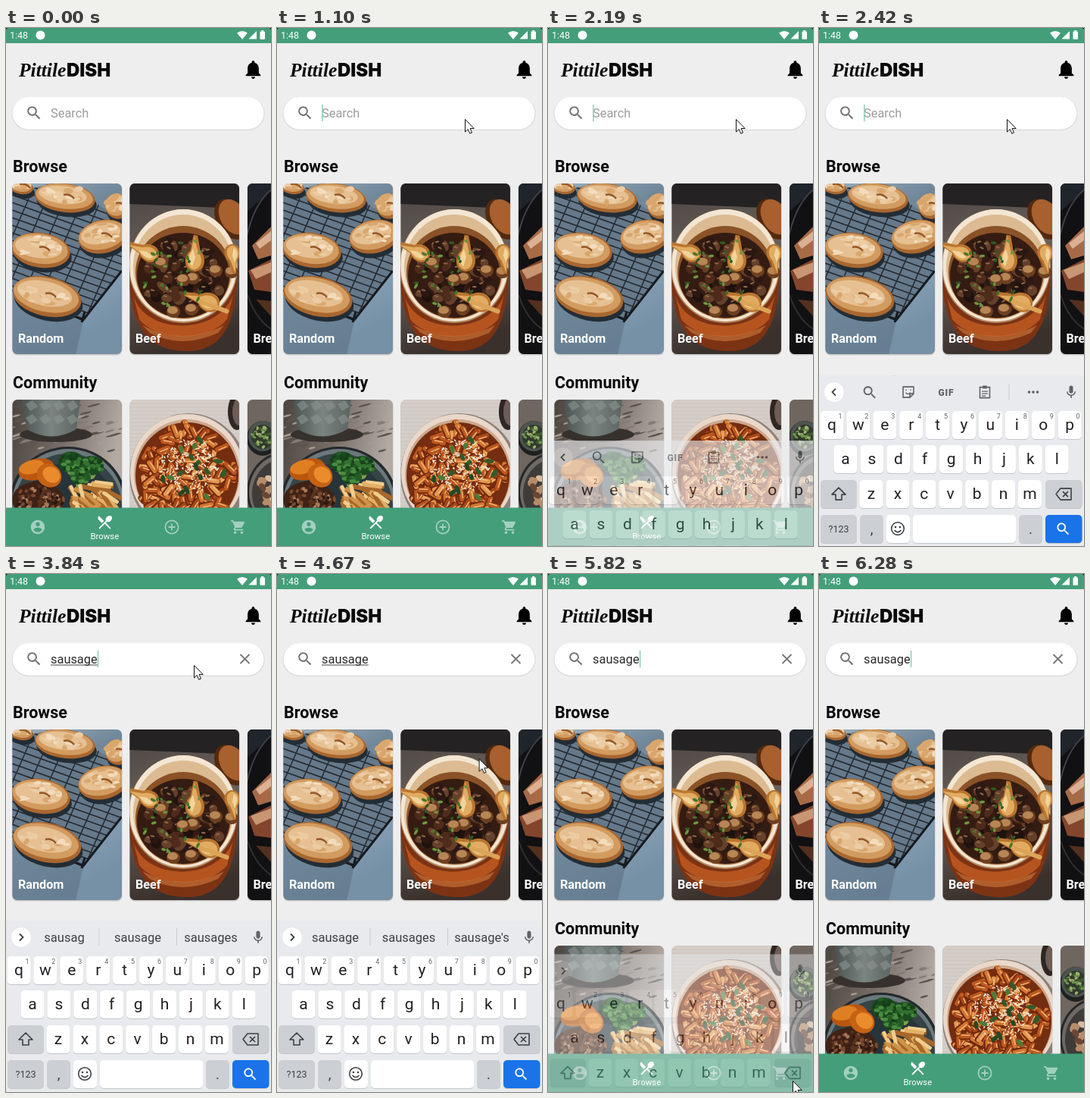
Animation, 350 px wide and 683 px high, one loop 8000 ms. Source, as an HTML page:

```html
<!DOCTYPE html>
<html lang="en">
<head>
<meta charset="utf-8">
<title>Recipe search</title>
<style>
html, body { margin: 0; width: 100%; height: 100%; overflow: hidden; background: #eee; }
svg { display: block; width: 350px; height: 683px; font-family: Roboto, sans-serif; }
.mid { text-anchor: middle; }
</style>
</head>
<body>
<svg id="stage" viewBox="0 0 350 683"></svg>
<script>
const GREEN = '#449e7a', GREY = '#5f6368', LOOP = 8000;

let seed = 48271;
const rnd = (a = 0, b = 1) => {
  seed = seed * 16807 % 2147483647;
  return a + (b - a) * seed / 2147483647;
};
const pick = list => list[Math.floor(rnd(0, list.length))];
const repeat = (n, fn) => Array.from({ length: n }, (_, i) => fn(i)).join('');

const ell = (x, y, rx, ry, fill, rot = 0) =>
  `<ellipse cx="${x}" cy="${y}" rx="${rx}" ry="${ry}" fill="${fill}" transform="rotate(${rot} ${x} ${y})"/>`;
const box = (x, y, w, h, fill, r = 0, more = '') =>
  `<rect x="${x}" y="${y}" width="${w}" height="${h}" rx="${r}" fill="${fill}" ${more}/>`;
const shape = (d, fill, more = '') => `<path d="${d}" fill="${fill}" ${more}/>`;
const line = (d, color, w = 1, more = '') =>
  `<path d="${d}" fill="none" stroke="${color}" stroke-width="${w}" ${more}/>`;
const text = (x, y, size, str, fill, more = '') =>
  `<text x="${x}" y="${y}" font-size="${size}" fill="${fill}" ${more}>${str}</text>`;
// 24-unit icon centred on x, y
const icon = (name, x, y, k, fill) =>
  shape(icons[name], fill, `transform="translate(${x - 12 * k} ${y - 12 * k}) scale(${k})"`);
// n random spots inside an ellipse
const scatter = (n, cx, cy, rx, ry, fn) => repeat(n, () => {
  const a = rnd(0, 6.283), r = Math.sqrt(rnd());
  return fn(cx + rx * r * Math.cos(a), cy + ry * r * Math.sin(a));
});
const gradient = (id, x2, y2, ...colors) =>
  `<linearGradient id="${id}" x2="${x2}" y2="${y2}">` +
  colors.map((c, i) => `<stop offset="${i / (colors.length - 1)}" stop-color="${c}"/>`).join('') + '</linearGradient>';

const icons = {
  bell: 'M12 22c1.1 0 2-.9 2-2h-4c0 1.1.89 2 2 2zm6-6v-5c0-3.07-1.64-5.64-4.5-6.32V4c0-.83-.67-1.5-1.5-1.5s-1.5.67-1.5 1.5v.68C7.63 5.36 6 7.92 6 11v5l-2 2v1h16v-1l-2-2z',
  user: 'M12 2C6.48 2 2 6.48 2 12s4.48 10 10 10 10-4.48 10-10S17.52 2 12 2zm0 3c1.66 0 3 1.34 3 3s-1.34 3-3 3-3-1.34-3-3 1.34-3 3-3zm0 14.2c-2.5 0-4.71-1.28-6-3.22.03-1.99 4-3.08 6-3.08 1.99 0 5.97 1.09 6 3.08-1.29 1.94-3.5 3.22-6 3.22z',
  food: 'M8.1 13.34l2.83-2.83L3.91 3.5c-1.56 1.56-1.56 4.09 0 5.66l4.19 4.18zm6.78-1.81c1.53.71 3.68.21 5.27-1.38 1.91-1.91 2.28-4.65.81-6.12-1.46-1.46-4.2-1.1-6.12.81-1.59 1.59-2.09 3.74-1.38 5.27L3.7 19.87l1.41 1.41L12 14.41l6.88 6.88 1.41-1.41L13.41 13l1.47-1.47z',
  cart: 'M7 18c-1.1 0-1.99.9-1.99 2S5.9 22 7 22s2-.9 2-2-.9-2-2-2zM1 2v2h2l3.6 7.59-1.35 2.45c-.16.28-.25.61-.25.96 0 1.1.9 2 2 2h12v-2H7.42c-.14 0-.25-.11-.25-.25l.03-.12.9-1.63h7.45c.75 0 1.41-.41 1.75-1.03l3.58-6.49c.08-.14.12-.31.12-.48 0-.55-.45-1-1-1H5.21l-.94-2H1zm16 16c-1.1 0-1.99.9-1.99 2s.89 2 1.99 2 2-.9 2-2-.9-2-2-2z',
  search: 'M15.5 14h-.79l-.28-.27C15.41 12.59 16 11.11 16 9.5 16 5.91 13.09 3 9.5 3S3 5.91 3 9.5 5.91 16 9.5 16c1.61 0 3.09-.59 4.23-1.57l.27.28v.79l5 4.99L20.49 19l-4.99-5zm-6 0C7.01 14 5 11.99 5 9.5S7.01 5 9.5 5 14 7.01 14 9.5 11.99 14 9.5 14z',
  mic: 'M12 14c1.66 0 2.99-1.34 2.99-3L15 5c0-1.66-1.34-3-3-3S9 3.34 9 5v6c0 1.66 1.34 3 3 3zm5.3-3c0 3-2.54 5.1-5.3 5.1S6.7 14 6.7 11H5c0 3.41 2.72 6.23 6 6.72V21h2v-3.28c3.28-.48 6-3.3 6-6.72h-1.7z'
};

function pastry(x, y, rx, ry, rot) {
  return ell(x + 2, y + 6, rx, ry, '#232d36', rot) +
    ell(x, y, rx, ry, '#a9672f', rot) +
    ell(x - 1, y - 2, rx * .95, ry * .86, '#d29b60', rot) +
    ell(x - 3, y - 4, rx * .8, ry * .62, '#e6c092', rot) +
    scatter(16, x - 2, y - 4, rx * .7, ry * .6, (a, b) =>
      ell(a, b, rnd(3, 8), rnd(1.5, 4), pick(['#f2dcbd', '#ebcca3', '#d9a76e']), rot + rnd(-20, 20))) +
    line(`M${x - 2} ${y - 4}q8 -2 14 5`, '#96582a', 2.5);
}

function rackPhoto() {
  const rack = 'M8 218L60 205 110 226 153 252V318L102 386 8 345Z';
  return box(8, 205, 146, 226, 'url(#slate)') + shape('M8 345L102 386 92 431H8Z', '#5e7486', 'opacity=".6"') +
    `<clipPath id="rack"><path d="${rack}"/></clipPath><g clip-path="url(#rack)">` +
    shape(rack, '#65798a') +
    repeat(22, i => line(`M8 ${150 + i * 10}l146 52`, '#262d35', 1.8)) +
    repeat(9, i => line(`M${30 + i * 24} 225l-72 165`, '#262d35', 1.6)) + '</g>' +
    line('M153 320L102 385 8 346', '#171b20', 3) + line('M104 374l-4 14', '#171b20', 3) +
    pastry(20, 210, 16, 9, 8) + pastry(78, 224, 40, 19, 7) + pastry(147, 235, 16, 17, -30) +
    pastry(128, 275, 33, 22, -12) + pastry(46, 293, 39, 23, 8) + pastry(54, 354, 46, 26, 12);
}

// bulb with a pointed end
function onion(x, y, rot, k = 1) {
  return `<g transform="translate(${x} ${y}) rotate(${rot}) scale(${k})">` +
    shape('M-19 0C-18-14-2-15 6-6L25-3 24 2 6 6C-2 14-18 13-19 0Z', '#b9752f') +
    shape('M-17-1C-15-11-2-12 5-5L23-2 5 3C-3 10-15 9-17-1Z', '#e0ac62') +
    shape('M-13-3C-9-9-2-8 8-3L-2 0Z', '#f2d49b') + '</g>';
}

function stewPhoto() {
  return box(163, 205, 146, 226, 'url(#cloth)') + shape('M163 205H309V238L163 232Z', '#242222') +
    ell(297, 252, 19, 29, '#54290f', -30) + ell(300, 249, 17, 25, '#a7602e', -30) +
    shape('M162 318C163 392 185 424 235 426S305 392 306 318Z', '#7c3314') +
    shape('M168 352C182 404 278 408 300 352L292 384C268 414 200 414 176 384Z', '#b6541f') +
    shape('M180 392Q232 420 288 392L280 402Q232 424 190 402Z', '#d07a3c', 'opacity=".6"') +
    ell(234, 314, 72, 75, '#b48a62') + ell(234, 313, 71, 74, '#f3e6d3') +
    ell(234, 315, 66, 69, '#dcbb92') + ell(234, 322, 63, 61, '#8b5227') + ell(234, 326, 61, 56, '#351c12') +
    scatter(75, 234, 328, 52, 47, (x, y) =>
      ell(x, y, rnd(5, 10), rnd(4, 8), pick(['#2c1812', '#4e2b1b', '#65402a', '#1f120e']), rnd(0, 180)) +
      ell(x - 2, y - 3, 3, 1.2, '#8d6445', rnd(-30, 30))) +
    [[247, 330], [277, 320], [234, 332], [252, 313], [221, 374], [245, 371], [298, 322], [205, 310]].map(([x, y]) =>
      ell(x, y, 9, 8, '#6d3f20') + ell(x - 1, y - 2, 7, 5, '#b78655')).join('') +
    onion(184, 294, 205) + onion(250, 300, -88, 1.1) + onion(262, 359, 200, 1.1) + onion(299, 302, 85, .9) +
    box(255, 357, 43, 6, '#dca458', 3, 'transform="rotate(20 255 357)"') +
    scatter(30, 228, 322, 50, 46, (x, y) => ell(x, y, rnd(2, 4), 1.8, pick(['#47742b', '#2f5a22', '#6e9641']), rnd(0, 180)));
}

function panPhoto() {
  return box(319, 205, 40, 226, '#111012') + shape('M319 205H350V214L319 242Z', '#20242b') +
    line('M318 275Q328 230 352 212', '#3f4046', 2) +
    shape('M325 287L350 262V300L333 305Z', '#a66a47') + shape('M330 284L350 268V280L335 291Z', '#dcb193') +
    shape('M320 320L350 305V348L328 345Z', '#84452d') + shape('M323 319L350 309V322L330 331Z', '#c99674') +
    shape('M330 358L350 360V380Z', '#53301f') + line('M319 352Q330 385 352 398', '#302f31', 2);
}

function dinnerPhoto() {
  const head = (x, y, r) => ell(x, y + 9, 6, 9, '#7f9f4a') + ell(x, y, r, r * .8, '#1c4a1f') +
    scatter(34, x, y, r, r * .75, (a, b) => ell(a, b, rnd(2, 4), 2.5, pick(['#245a25', '#33722f', '#163f1a', '#4a8c40'])));
  return box(8, 490, 146, 145, 'url(#stone)') +
    scatter(70, 80, 535, 80, 45, (x, y) => ell(x, y, rnd(4, 12), 1.3, pick(['#a59b93', '#5b534d', '#857b73']), -15)) +
    ell(66, 536, 48, 10, '#37312e') +
    shape('M21 490H98L93 529Q60 548 27 529Z', 'url(#pot)') +
    repeat(8, i => shape(`M${26 + i % 4 * 18} ${496 + (i >> 2) * 18}l9-5 7 8-10 6z`, '#8a9490', 'opacity=".6"')) +
    ell(82, 628, 78, 76, '#23292c') + ell(82, 628, 74, 73, '#6b787c') + ell(82, 632, 71, 71, '#364347') + ell(84, 637, 62, 64, '#27343a') +
    ell(42, 622, 34, 24, '#3f2216') +
    scatter(75, 44, 622, 33, 19, (x, y) => ell(x, y, rnd(2, 4), 2, pick(['#7b4a31', '#a87b5b', '#2c1710', '#59331f']), rnd(0, 180))) +
    ell(40, 582, 24, 14, '#b9560f', -14) + ell(34, 579, 17, 9, '#e07f22', -14) + ell(57, 590, 17, 15, '#c66214', 35) +
    ell(60, 589, 12, 10, '#ea8b2c', 35) + head(86, 572, 17) + head(113, 577, 16) + head(98, 591, 14) +
    repeat(30, () => {
      const x = rnd(84, 134), y = rnd(594, 632);
      return box(x, y, 26, 6, '#a8682a', 1.5, `transform="rotate(${rnd(5, 85)} ${x} ${y})"`) +
        box(x, y - 1, 25, 5, pick(['#e2b066', '#d0934a', '#f0cd8e']), 1.5, `transform="rotate(${rnd(5, 85)} ${x} ${y})"`);
    });
}

function pastaPhoto() {
  return box(163, 490, 146, 145, '#d5cec8') +
    repeat(30, i => line(`M163 ${490 + i * 5}h146`, '#cbc3bc', 1)) +
    ell(305, 506, 12, 24, '#2f2724') + ell(308, 506, 9, 18, '#6e5d55') +
    ell(241, 589, 78, 81, '#8d8078') + ell(239, 586, 75, 77, '#e9d8ca') + ell(239, 588, 70, 72, '#cda78c') +
    ell(239, 590, 68, 70, '#742d10') +
    scatter(190, 239, 590, 62, 65, (x, y) =>
      `<g transform="translate(${x} ${y}) rotate(${rnd(0, 180)})">` + box(-10, -3.5, 20, 8, '#71290d', 3) +
      box(-10, -3.5, 19, 6, pick(['#d5762f', '#bd5820', '#e29750', '#a8481a']), 3) +
      box(-7, -2.5, 12, 1.5, '#f0b878', 1) + '</g>') +
    scatter(190, 242, 578, 38, 36, (x, y) => ell(x, y, rnd(1, 3), .8, '#f6e9d2', rnd(0, 180))) +
    scatter(17, 239, 575, 52, 50, (x, y) => ell(x, y, rnd(4, 7), 3, pick(['#35592a', '#4d7a38', '#274821']), rnd(0, 180)));
}

function bowlPhoto() {
  return box(319, 490, 40, 145, '#6f665f') +
    ell(339, 541, 21, 23, '#1f2020') + ell(339, 538, 19, 20, '#4d5450') + ell(339, 539, 15, 16, '#303a2c') +
    scatter(36, 338, 539, 13, 14, (x, y) => ell(x, y, 2.5, 1.6, pick(['#6f9450', '#3d602f', '#a3b172']), rnd(0, 180))) +
    ell(370, 612, 52, 54, '#26282a') + ell(370, 612, 49, 51, '#6d6965') + ell(370, 614, 45, 47, '#3f3b39') +
    scatter(20, 350, 612, 16, 28, (x, y) => ell(x, y, 6, 4, pick(['#b68c69', '#6b4635', '#d9bca0']), rnd(0, 180)));
}

function card(x, y, art, label = '') {
  const id = `card${x}-${y}`.replace('.', '_');
  return box(x - .5, y + .5, 145.5, 226, '#c9c9c9', 7) +
    `<clipPath id="${id}">${box(x, y, 144.5, 225, '#000', 6.5)}</clipPath>` +
    `<g clip-path="url(#${id})">${art()}</g>` +
    text(x + 7.5, y + 210, 16.2, label, '#fff', 'font-weight="700"');
}

function page() {
  const soft = '#a3d0be';
  return box(0, 0, 350, 683, '#eee') + box(0, 0, 350, 20, GREEN) +
    shape('M0 3V0H3Q0 0 0 3ZM347 0H350V3Q350 0 347 0Z', '#000') +
    text(5, 14, 12.5, '1:48', '#fff') + ell(45.5, 9.5, 6, 6, '#fff') +
    shape('M305 6.5Q312 1.5 319 6.5L312 15Z', '#fff') + shape('M320.5 14.5L331 4V14.5Z', '#fff') +
    box(335.5, 4.5, 6.5, 10.5, '#fff', 1.2) + box(337.2, 3, 3, 2, '#fff') +
    text(17, 64, 25.5, 'Pittile', '#0b0b0b', 'font-family="Liberation Serif, serif" font-weight="700" font-style="italic"') +
    text(80, 64, 24, 'DISH', '#0b0b0b', 'font-family="Inter, sans-serif" font-weight="900"') +
    icon('bell', 326.5, 54.7, 1.23, '#000') +
    box(7.5, 91, 334, 44, '#d9d9d9', 22) + box(8.5, 91, 332, 42.7, '#fff', 21.3) +
    icon('search', 37, 112, .98, '#757575') +
    text(9, 189.5, 21.5, 'Browse', '#0a0a0a', 'font-weight="700"') +
    text(9, 475, 21.5, 'Community', '#0a0a0a', 'font-weight="700"') +
    card(8.5, 205, rackPhoto, 'Random') + card(163.5, 205, stewPhoto, 'Beef') + card(319, 205, panPhoto, 'Breakfast') +
    card(8.5, 490, dinnerPhoto) + card(163.5, 490, pastaPhoto) + card(319, 490, bowlPhoto) +
    box(0, 632.5, 350, 51, GREEN) + icon('user', 42, 658, .92, soft) +
    icon('food', 130.5, 651.5, .97, '#fff') + text(130.3, 674.3, 11.4, 'Browse', '#fff', 'class="mid"') +
    `<circle cx="219" cy="658" r="8.6" fill="none" stroke="${soft}" stroke-width="1.8"/>` +
    line('M214.5 658h9M219 653.5v9', soft, 1.8) + icon('cart', 307, 658, .9, soft);
}

function keyboard() {
  const key = (x, y, w, fill) => box(x, y + 1, w, 37, '#c3c6cb', 5) + box(x, y, w, 37, fill, 5);
  const row = (keys, x0, y) => [...keys].map((c, i) => {
    const x = x0 + i * 34.9;
    return key(x - 15.5, y, 31, '#fff') + text(x, y + 25, 21, c, '#202124', 'class="mid"');
  }).join('');
  const dark = '#cccfd4', ink = '#3c4043';
  return box(0, 457, 350, 226, '#e8eaed') +
    `<circle cx="20" cy="479" r="13.5" fill="#fff" stroke="#dadce0" stroke-width=".6"/>` +
    line('', ink, 1.8, 'id="chevron"') + icon('mic', 333, 479, .85, GREY) +
    '<g id="tools">' + icon('search', 67, 479.5, .92, GREY) +
    line('M111 472h14v9l-5 5h-9zM125 481h-5v5', GREY, 1.6, 'stroke-linejoin="round"') +
    line('M114.5 479.5q3 4 6 0M115 475.5v1.5M121 475.5v1.5', GREY, 1.3) +
    text(168, 483.5, 12, 'GIF', GREY, 'class="mid" font-weight="900" letter-spacing=".8"') +
    line('M212.5 472.5h13v14h-13z', GREY, 1.6) + box(216, 470.5, 6, 4, GREY, 1) +
    line('M215 478h8M215 481h8M215 484h5', GREY, 1.1) + box(250.5, 469, 1, 21, '#c9ccd1') +
    repeat(3, i => ell(277.5 + i * 5.5, 479, 1.8, 1.8, GREY)) + '</g>' +
    '<g id="words">' + box(122.5, 467, 1, 23, '#c9ccd1') + box(225, 467, 1, 23, '#c9ccd1') +
    [77, 174, 270.5].map(x => text(x, 485, 16.5, '', ink, 'class="mid"')).join('') + '</g>' +
    row('qwertyuiop', 17, 504) + repeat(10, i => text(28 + i * 34.9, 514, 9, (i + 1) % 10, GREY, 'class="mid"')) +
    row('asdfghjkl', 35, 549) + row('zxcvbnm', 69, 595) +
    key(2, 595, 48, dark) + line('M26 605l9 9h-5v7h-8v-7h-5z', ink, 1.6, 'stroke-linejoin="round"') +
    key(299, 595, 48.5, dark) + line('M319 606h14v15h-14l-6-7.5zM322 610l7 7M329 610l-7 7', ink, 1.6, 'stroke-linejoin="round"') +
    key(2, 641, 48, dark) + text(26, 664, 12.5, '?123', ink, 'class="mid"') +
    key(54, 641, 31, dark) + text(69.5, 666, 19, ',', ink, 'class="mid"') +
    key(89, 641, 31, '#fff') + `<circle cx="104" cy="659" r="8.3" fill="none" stroke="${ink}" stroke-width="1.6"/>` +
    ell(101, 657, 1.3, 1.3, ink) + ell(107, 657, 1.3, 1.3, ink) + line('M99.5 661q4.5 5 9 0', ink, 1.6) +
    key(124, 641, 136, '#fff') + key(264, 641, 31, dark) + text(279.5, 666, 19, '.', ink, 'class="mid"') +
    key(299, 641, 48.5, '#1a73e8') + icon('search', 322.5, 659.5, .9, '#fff');
}

const stage = document.getElementById('stage');
stage.innerHTML = '<defs>' +
  gradient('slate', .35, 1, '#9db0bc', '#70879a', '#8aa3b8', '#7690a6') +
  gradient('cloth', .2, 1, '#4a4442', '#6a615b', '#3a302c') +
  gradient('stone', 1, .2, '#4b443f', '#776d66', '#b3aaa3') +
  gradient('pot', 1, 0, '#4a5250', '#7a8481', '#5a6360') + '</defs>' + page() +
  text(59, 118, 16.4, '', '#2a2a2a', 'id="query"') + box(59, 119.5, 0, 1, '#444', 0, 'id="under"') +
  box(59.2, 101, 1.4, 22, '#86cbab', 0, 'id="caret"') +
  line('M309.5 106l12 12M321.5 106l-12 12', '#757575', 1.8, 'id="clear"') +
  `<g id="keys">${keyboard()}</g>` +
  shape('M0 0V16.5L3.8 13 6.3 18.7 9 17.5 6.6 12H11.7Z', '#fff', 'id="mouse" stroke="#111" stroke-width="1"');

const $ = id => document.getElementById(id);
const show = (id, on) => $(id).setAttribute('visibility', on ? 'inherit' : 'hidden');
const words = [...$('words').querySelectorAll('text')];

const typed = [[0, ''], [2940, 's'], [3110, 'sa'], [3430, 'sau'], [3520, 'saus'], [3600, 'sausa'], [3720, 'sausag'], [3840, 'sausage']];
const hints = [[0, ''], [3030, 's so she'], [3280, 'sa say same'], [3480, 'sau sauce saute'], [3640, 'sausa sausage sausages'],
  [3840, 'sausag sausage sausages'], [4050, "sausage sausages sausage's"], [5770, '']];
const caretOff = [[0, 1100], [1430, 1950], [2620, 2940], [4470, 4980]];
const mousePath = [[510, 346, 135], [620, 285, 121], [740, 237, 109], [820, 243, 116], [890, 248.5, 120.5],
  [4470, 248.5, 120.5], [4600, 256, 175], [4760, 281, 330], [4920, 312, 510], [5060, 333, 625], [5160, 336, 661], [5260, 323.5, 668.5],
  [6210, 323.5, 668.5], [6235, 329, 672], [6280, 345, 681]];

const at = (table, t) => table.filter(s => s[0] <= t).pop()[1];

function mousePos(t) {
  const i = mousePath.findIndex(p => p[0] > t);
  if (i < 1) return null;
  const [t0, x0, y0] = mousePath[i - 1], [t1, x1, y1] = mousePath[i], k = (t - t0) / (t1 - t0);
  return [x0 + (x1 - x0) * k, y0 + (y1 - y0) * k];
}

// slide offset and opacity of the keyboard
function keysState(t) {
  if (t < 2110 || t >= 6030) return [226, 0];
  if (t < 2450) {
    const p = (t - 2110) / 340;
    return [150 * (1 - p) ** 2, Math.min(1, .3 + p * 1.4)];
  }
  if (t < 5770) return [0, 1];
  const p = (t - 5770) / 260;
  return [226 * p, (1 - p) ** 4];
}

function draw(t) {
  const word = at(typed, t), query = $('query');
  query.textContent = word || 'Search';
  query.setAttribute('fill', word ? '#2a2a2a' : '#9c9c9c');
  const width = word ? query.getComputedTextLength() : 0;
  $('under').setAttribute('width', t < 5770 ? width : 0);
  $('caret').setAttribute('x', 59.2 + width);
  show('caret', !caretOff.some(([a, b]) => t >= a && t < b));
  show('clear', word);

  const tips = at(hints, t).split(' ');
  words.forEach((el, i) => el.textContent = tips[i] || '');
  show('tools', !word);
  show('words', tips[0]);
  $('chevron').setAttribute('d', word ? 'M18 474.5l4.5 4.5-4.5 4.5' : 'M22 474.5l-4.5 4.5 4.5 4.5');

  const [y, alpha] = keysState(t);
  $('keys').setAttribute('transform', `translate(0 ${y})`);
  $('keys').setAttribute('opacity', alpha);
  show('keys', alpha > 0);

  const pos = mousePos(t);
  show('mouse', pos);
  if (pos) $('mouse').setAttribute('transform', `translate(${pos})`);
}

const start = performance.now();
function frame() {
  draw((performance.now() - start) % LOOP);
  requestAnimationFrame(frame);
}
frame();
</script>
</body>
</html>
```
